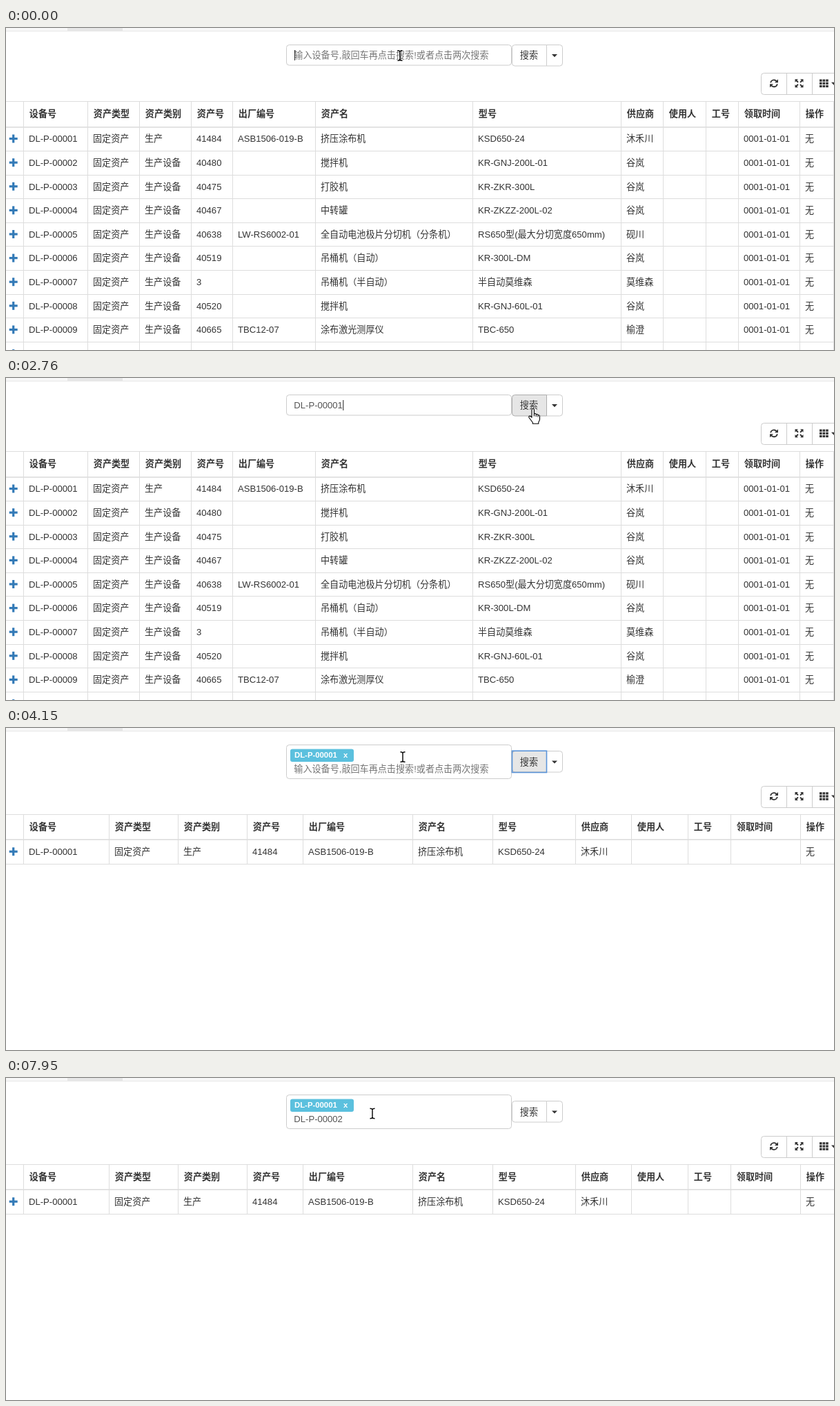
These frames come from a looping animation (1200x467 px, 8000 ms). An HTML page with a canvas:

```html
<!DOCTYPE html>
<html lang="zh-CN">
<head>
<meta charset="utf-8">
<title>设备搜索</title>
<style>
html, body { margin: 0; width: 100%; height: 100%; overflow: hidden; background: #fff; }
canvas { display: block; }
</style>
</head>
<body>
<canvas id="stage" width="1200" height="467"></canvas>
<script>
const ctx = document.getElementById('stage').getContext('2d');
const FAMILY = '"Liberation Sans", "Noto Sans CJK SC", "Noto Sans CJK", sans-serif';
const LOOP = 8000, SHIFT = 18.7, PITCH = 34.62;
const TYPED = 1370, CLICK = 2910, FILTERED = 3080, BLUR = 4536;
const PLACEHOLDER = '输入设备号,敲回车再点击搜索!或者点击两次搜索';

const HEADS = '设备号|资产类型|资产类别|资产号|出厂编号|资产名|型号|供应商|使用人|工号|领取时间|操作'.split('|');
const ALL_COLS = [25, 118, 193, 268, 328, 448, 676, 891, 952, 1014, 1061, 1150, 1199];
const ONE_COLS = [25, 149, 249, 349, 430, 589, 705, 825, 906, 988, 1050, 1151];

// number | serial | asset name | model | supplier
const ROWS = [
  '41484|ASB1506-019-B|挤压涂布机|KSD650-24|沐禾川',
  '40480||搅拌机|KR-GNJ-200L-01|谷岚',
  '40475||打胶机|KR-ZKR-300L|谷岚',
  '40467||中转罐|KR-ZKZZ-200L-02|谷岚',
  '40638|LW-RS6002-01|全自动电池极片分切机（分条机）|RS650型(最大分切宽度650mm)|砚川',
  '40519||吊桶机（自动）|KR-300L-DM|谷岚',
  '3||吊桶机（半自动）|半自动莫维森|莫维森',
  '40520||搅拌机|KR-GNJ-60L-01|谷岚',
  '40665|TBC12-07|涂布激光测厚仪|TBC-650|榆澄',
  '||||'
].map(r => r.split('|'));

// pointer runs: start time, step length, then x,y per step
const RUNS = [
  [0, 1, '571,40'],
  [2070, 76, '600,43 650,50 700,56 745,51 770,50 778,48'],
  [2680, 80, '772,46 764,45'],
  [3610, 77, '763,47 755,50 738,49 710,46 680,42 640,37 605,35 575,42 550,42 530,40 515,38'],
  [4460, 76, '514,38 514,38 514,38 516,40 519,42 521,44 523,46 525,47 526,48.5'],
  [7950, 1, '531,51.5']
].map(([start, step, path]) => ({ start, step, points: path.split(' ').map(p => p.split(',').map(Number)) }));

const CARET_ON = [[0, 440], [970, 1900], [2430, CLICK], [BLUR, 5070], [5620, 6550], [7160, 7630]];
const within = (t, a, b) => t >= a && t < b;

function pointerAt(t) {
  const run = RUNS.filter(r => r.start <= t).pop();
  return run.points[Math.min(run.points.length - 1, Math.floor((t - run.start) / run.step))];
}

function fieldText(t) {
  if (t < TYPED || within(t, CLICK, 6000)) return '';
  if (t < 6780) return 'DL-P-00001';
  return t < 7160 ? 'DL-P-0000' : 'DL-P-00002';
}

function text(str, x, mid, color = '#333', size = 13.1, weight = '') {
  ctx.font = `${weight} ${size}px ${FAMILY}`;
  ctx.fillStyle = color;
  ctx.fillText(str, x, mid + size * 0.35);
}

function rect(x, y, w, h, color) {
  ctx.fillStyle = color;
  ctx.fillRect(x, y, w, h);
}

function box(x, y, w, h, radius, fill, stroke, line = 1) {
  ctx.beginPath();
  ctx.roundRect(x, y, w, h, radius);
  ctx.fillStyle = fill;
  ctx.fill();
  if (!stroke) return;
  ctx.strokeStyle = stroke;
  ctx.lineWidth = line;
  ctx.stroke();
}

function poly(points, color = '#333') {
  ctx.beginPath();
  points.forEach(p => ctx.lineTo(...p));
  ctx.fillStyle = color;
  ctx.fill();
}

const dropArrow = (x, y) => poly([[x - 4, y - 2], [x + 4, y - 2], [x, y + 2.2]]);

function refreshIcon(x, y) {
  ctx.save();
  ctx.translate(x, y);
  ctx.strokeStyle = '#333';
  ctx.lineWidth = 1.9;
  for (let i = 0; i < 2; i++) {
    ctx.beginPath();
    ctx.arc(0, 0, 4.9, Math.PI * 1.06, Math.PI * 1.78);
    ctx.stroke();
    poly([[6, -6], [6, -1], [1, -1]]);
    ctx.rotate(Math.PI);
  }
  ctx.restore();
}

function expandIcon(x, y) {
  ctx.save();
  ctx.translate(x, y);
  for (let i = 0; i < 4; i++) {
    poly([[6, -6], [6, -1.6], [4.6, -3], [2.2, -0.8], [0.9, -2.1], [3.1, -4.5], [1.6, -6]]);
    ctx.rotate(Math.PI / 2);
  }
  ctx.restore();
}

function toolbar(dy) {
  box(1094.5, Math.round(65 + dy) + 0.5, 120, 31, 4, '#fff', '#ccc');
  const y = 80.3 + dy;
  for (const x of [1131, 1168]) rect(x, Math.round(65 + dy), 1, 32, '#ccc');
  refreshIcon(1113, y);
  expandIcon(1149.5, y);
  for (let i = 0; i < 9; i++) rect(1179 + i % 3 * 4.6, y - 5.8 + Math.floor(i / 3) * 4.2, 3.6, 3.2, '#333');
  dropArrow(1200, y + 0.5);
}

function table(dy, filtered) {
  const cols = filtered ? ONE_COLS : ALL_COLS;
  const rows = filtered ? ROWS.slice(0, 1) : ROWS;
  const top = Math.round(106 + dy);
  const bottom = filtered ? 197 : 467;
  rect(0, top, 1200, 1, '#ddd');
  rect(0, Math.round(142.6 + dy), 1200, 1.6, '#ddd');
  cols.forEach(x => rect(x, top, 1, bottom - top, '#ddd'));
  HEADS.forEach((h, i) => text(h, cols[i] + 8.8, 124.8 + dy, '#333', 13.1, 'bold'));
  rows.forEach((row, i) => {
    const mid = 160.8 + dy + i * PITCH;
    rect(0, Math.round(178 + dy + i * PITCH), 1200, 1, '#ddd');
    rect(4.7, mid - 1.9, 12, 3.2, '#337ab7');
    rect(9.1, mid - 6.3, 3.2, 12, '#337ab7');
    if (!row[0]) return;
    const cells = ['DL-P-0000' + (i + 1), '固定资产', i ? '生产设备' : '生产', ...row,
      '', '', filtered ? '' : '0001-01-01', '无'];
    cells.forEach((c, k) => text(c, cols[k] + 8, mid));
  });
}

function searchBar(t, tagged, overButton) {
  const dy = tagged ? 19.4 : 0;
  const by = tagged ? 9.4 : 0;
  box(406.5, 24.5, 326, tagged ? 49 : 29.5, 4, '#fff', '#ccc');
  if (tagged) {
    box(412, 30.5, 92, 18.5, 3, '#5bc0de');
    text('DL-P-00001', 418, 39.3, '#fff', 11.35, 'bold');
    text('x', 489, 39.3, '#fff', 11.35, 'bold');
  }
  const value = fieldText(t);
  text(value || PLACEHOLDER, 417.3, 39.6 + dy, value ? '#555' : '#757575');
  if (CARET_ON.some(([a, b]) => within(t, a, b))) rect(value ? 488.3 : 418, 32 + dy, 1, 15, '#222');

  const pressed = within(t, CLICK, FILTERED);
  const focused = within(t, CLICK, BLUR);
  const fill = pressed ? '#d4d4d4' : focused || overButton ? '#e6e6e6' : '#fff';
  const y = Math.round(24 + by) + 0.5;
  box(783.5, y, 23, 30.5, [0, 4, 4, 0], '#fff', '#ccc');
  box(733.5, y, 50, 30.5, [4, 0, 0, 4], fill, fill === '#fff' ? '#ccc' : '#adadad');
  if (focused) {
    ctx.strokeStyle = '#5b94d9';
    ctx.lineWidth = 1.6;
    ctx.strokeRect(733.5, y - 0.3, 50, 31.3);
  }
  text('搜索', 744.8, 39.6 + by);
  dropArrow(795, 40 + by);
}

function iBeam(x, y) {
  ctx.beginPath();
  for (const s of [-1, 1]) {
    ctx.moveTo(x - 3.5, y + s * 7.3);
    ctx.quadraticCurveTo(x, y + s * 7.3, x, y + s * 5.5);
    ctx.quadraticCurveTo(x, y + s * 7.3, x + 3.5, y + s * 7.3);
  }
  ctx.moveTo(x, y - 6);
  ctx.lineTo(x, y + 6);
  ctx.strokeStyle = '#000';
  ctx.lineWidth = 1.4;
  ctx.stroke();
}

const HAND = new Path2D(`M-2 1Q-2 -.5 -.3 -.5Q1.4 -.5 1.4 1V7Q3.8 5.6 4.2 8Q6.6 6.8 7 9
  Q9.5 8.2 9.5 11V15Q9.3 17 7.8 19V21.2H-.7V19.5L-5.6 13Q-7 10.8 -5.4 10.2Q-4 9.7 -2 12.2Z
  M1.4 7V10.5M4.2 8V11M7 9V11.5`);

function hand(x, y) {
  ctx.save();
  ctx.translate(x, y);
  ctx.fillStyle = '#fff';
  ctx.fill(HAND);
  ctx.strokeStyle = '#000';
  ctx.lineWidth = 1.1;
  ctx.lineJoin = 'round';
  ctx.stroke(HAND);
  ctx.restore();
}

function draw(t) {
  const tagged = t >= CLICK;
  const dy = tagged ? SHIFT : 0;
  const [x, y] = pointerAt(t);
  const overButton = x > 733;
  rect(0, 0, 1200, 467, '#fff');
  rect(0, 0, 1200, 4, '#f8f8f8');
  rect(0, 4, 1200, 1, '#e7e7e7');
  rect(89, 0, 80, 4, '#e7e7e7');
  searchBar(t, tagged, overButton);
  toolbar(dy);
  table(dy, t >= FILTERED);
  if (within(t, CLICK, FILTERED) || within(t, BLUR, 4688)) {
    ctx.beginPath();
    ctx.arc(x - 1, y, 10.8, 0, 7);
    ctx.fillStyle = 'rgba(228,184,36,.7)';
    ctx.fill();
  }
  (overButton ? hand : iBeam)(x, y);
}

const start = performance.now();
function tick() {
  draw((performance.now() - start) % LOOP);
  requestAnimationFrame(tick);
}
tick();
</script>
</body>
</html>
```
